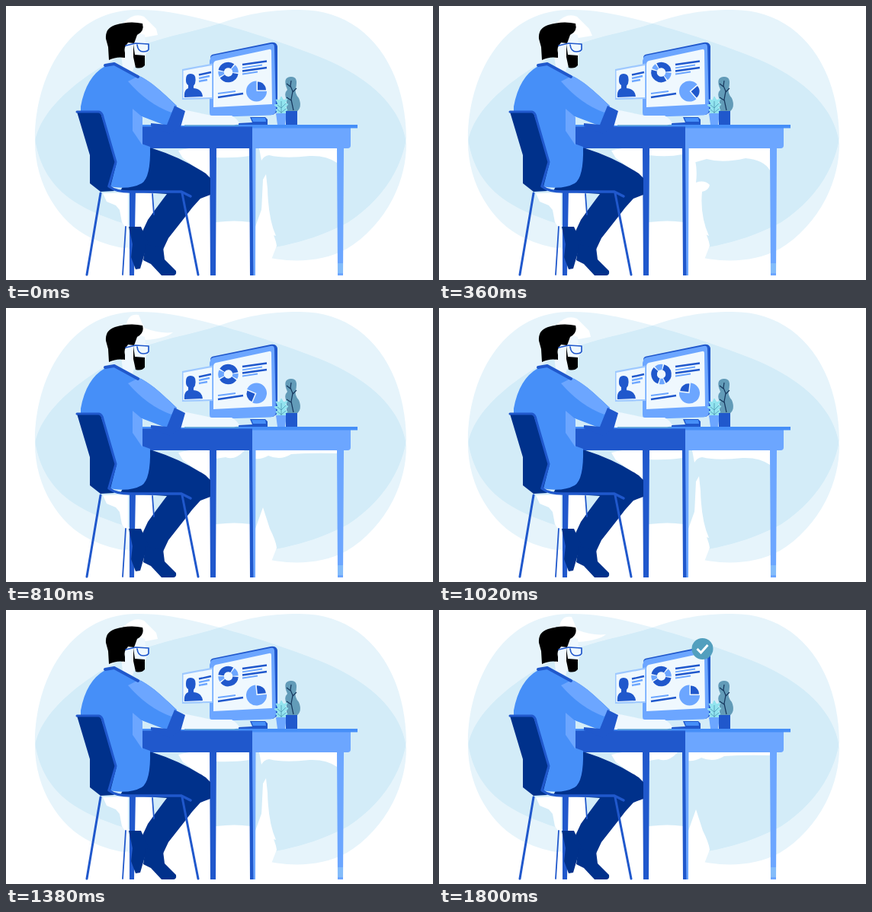
Write an HTML page that moves like this. It is 560x360 px and loops after 4530 ms.

```html
<!DOCTYPE html>
<html lang="en">
<head>
<meta charset="utf-8">
<style>
html, body { margin: 0; width: 100%; height: 100%; overflow: hidden; background: #fff; }
svg { display: block; width: 560px; height: 360px; }
.navy { fill: #00318b; }
.dark { fill: #2058cc; }
.mid { fill: #468ff8; }
.light { fill: #6ca6ff; }
.pale { fill: #eff8fe; }
.white { fill: #fff; }
.line { fill: none; stroke: #2058cc; stroke-linecap: round; stroke-linejoin: round; }
.bars { fill: none; stroke-width: 2.4; }
</style>
</head>
<body>
<svg viewBox="0 0 560 360">
  <defs>
    <path id="blobA" d="M168 5C205 4 240 12 280 23C330 37 362 48 404 64C462 86 517 123 525 181C525 238 492 292 447 319C412 338 367 338 331 327C270 307 190 302 130 277C72 255 46 224 38 175C38 93 82 8 168 5Z"/>
    <path id="blobB" d="M385 5C340 5 312 12 280 23C246 34 212 39 177 52C108 84 46 130 38 179C38 230 66 283 112 305C164 329 216 320 270 322C334 326 399 311 449 284C494 254 518 215 525 174C524 78 472 5 385 5Z"/>
    <clipPath id="insideA"><use href="#blobA"/></clipPath>
  </defs>

  <g fill="#e6f4fb"><use href="#blobA"/><use href="#blobB"/></g>
  <use href="#blobB" fill="#d3ecf8" clip-path="url(#insideA)"/>

  <!-- gaps in the backdrop -->
  <g class="white">
    <path d="M127 246L160 245V360H154L155 318L160 317L158 293L152 284L149 268L144 262L132 257Z"/>
    <path d="M168 360V246H193V282L214 290L237 262L246 247H268V285L276 284Q300 281 321 284L327 290L337 262L346 290Q354 306 355 315L348 333V360Z"/>
    <path d="M226 190L240 187H268V226L232 200Z"/>
    <path id="deskGap"/>
    <path id="slit"/>
    <path id="headGap"/>
  </g>

  <!-- desk -->
  <path class="dark" d="M162 240H170L168 354H162ZM267 186H276L275 354H268ZM319 186H324L325 354H320Z"/>
  <path class="light" d="M323 186H327.500L327 354H324.500ZM434 186H443L442 354H435Z"/>
  <path d="M435 338H442V351H435Z" fill="#83bcfa"/>
  <path class="dark" d="M178 156H323V187H183L178 182Z"/>
  <path class="light" d="M323 160H452V183Q452 187 448 187H323Z"/>
  <path class="mid" d="M178 156H461V160.500H323V159H178Z"/>
  <path class="dark" d="M178 158.500H323V161H178Z"/>

  <!-- monitor -->
  <path class="dark" d="M320 146H340L343 149V156H305V154L323 153Z"/>
  <path class="mid" d="M322 147H340L341 152H324Z"/>
  <path class="dark" d="M268 68Q268 64 272 63.500L347 48Q355 47 356 53V139L350 143Z"/>
  <path class="light" d="M268 69Q268 66 272 65L347 50Q352 49 352 54L354 136Q354 143 347 143.500L273 146Q267 146 267 140V72Z"/>
  <path class="pale" d="M272 77Q272 73 275 72L345 57Q348 56 348 60L349 129L272 133Z"/>
  <g class="bars">
    <path d="M310 77L342 72.500M310 85.500L342 81M278 120L311 115" stroke="#2058cc"/>
    <path d="M310 81.300L336 77.500M310 89.500L330 86.500M278 115L301 112" stroke="#6ca6ff" stroke-width="1.800"/>
  </g>
  <g id="donut" fill="none" stroke-width="7.500"></g>
  <g id="pie">
    <path class="light" d="M0 0V-13.500A13.500 13.500 0 1 0 13.500 0Z"/>
    <path class="dark" d="M1.500 -1.500V-12.500A11 11 0 0 1 12.500 -1.500Z"/>
  </g>

  <!-- profile card -->
  <path d="M231 83L271 75.500V122L231 123Z" fill="#9dc8ff"/>
  <path class="pale" d="M232.500 85L270 78V120L232.500 121Z"/>
  <path class="dark" d="M234 120Q233 110 239 108V104Q235.500 102 236 96Q236 89 242 89Q248.500 89 248.500 96Q249 102 246 105V108Q257 109 258 119Z"/>
  <path class="bars" d="M253 90.500L269 87" stroke="#2058cc"/>
  <path class="bars" d="M253 95L267 92M253 99L264 97" stroke="#6ca6ff"/>

  <!-- plants -->
  <path d="M368 139V123Q364 115 369 110Q362 94 373 93Q384 92 380 108Q378 114 384 121Q389 133 381 139Z" fill="#629bb8"/>
  <path d="M374 98L373 105L376 112L374 123L377 137M373 106L368 102M376 113L381 108M374 124L368 120" fill="none" stroke="#15365c" stroke-width="1.200"/>
  <path d="M357 142L354 136L358 135L352 130L357 129L354 123L359 124L361 119L364 124L369 122L366 128L370 129L366 134L369 136L365 142Z" fill="#92e4ef" stroke="#92e4ef" stroke-linejoin="round"/>
  <path d="M356 130L361 134L367 128M356 136L361 140L367 135M361 125V141" fill="none" stroke="#438ca9" stroke-width=".7"/>
  <path class="light" d="M354 141H368L366 156H356Z"/>
  <path class="dark" d="M367 138H382V156H367Z"/>

  <!-- trousers and shoes -->
  <path class="navy" d="M180 186L192 187Q230 199 262 220L268 226V248L255 253Q245 263 235 277L213 305L206 320L183 316L179 296L186 281Q198 264 211 247L150 243Z"/>
  <path class="navy" d="M161 290H177L188 314L183 321L176 345L170 346L164 330L166 313Z"/>
  <path class="navy" d="M183 313L206 317L208 333L223 348Q224 354 219 354H204L190 339L180 334Z"/>

  <!-- shirt -->
  <path class="mid" d="M130 79Q105 93 98 132L98 140L125 142L142 206L135 237Q162 242 178 233Q190 225 189 185L178 181V145L212 158L224 131C210 118 190 98 173 91L139 76Z"/>
  <path class="light" d="M166 135L179 146V183L166 164Z"/>
  <path class="light" d="M160 99L174 92C190 98 210 118 223 131L217 140Q186 129 160 99Z"/>

  <!-- arm -->
  <path class="pale" d="M232 136L270 144L296 144Q303 148 306 154L299 157H229Z"/>
  <path class="dark" d="M221 131L235 138L229 159L215 168L190 158V154L211 156Z"/>
  <path d="M234 157H305" stroke="#58a0d4" stroke-width="1.600"/>

  <!-- chair -->
  <path class="navy" d="M93 139L124 140L145 206L137 237L142 243L124 244L110 233V196Z"/>
  <path class="line" d="M93 139H122Q126 140 127 146L144 205L135 236" stroke-width="3"/>
  <path class="line" d="M135 237Q145 245 168 244H230L242 250" stroke-width="3.500"/>
  <path class="line" d="M124 246L106 353M231 246L252 353" stroke-width="3"/>
  <path class="line" d="M192 247L194 274M157 290L153 353" stroke-width="1.800"/>

  <!-- head -->
  <path class="pale" d="M150 40L166 33L182 38L184 62L180 78L168 80L166 86L153 80L151 64Z"/>
  <path d="M135 71L134 54L131 43Q130 29 143 25Q162 19 179 23Q182 33 172 38L168 49L160 48L156 55V68Q145 66 135 71Z"/>
  <path d="M167 50L169 64L182 65V78Q178 83 170 81L167 67Z"/>
  <ellipse class="pale" cx="161" cy="58" rx="5.500" ry="8.500"/>
  <path class="pale" d="M171 51H187V60Q181 63 173 60Z"/>
  <path class="line" d="M157 52L170 49L187 50V57Q186 60 180 60Q173 60 172 51" stroke-width="1.700"/>
  <path class="line" d="M130 78L142 76L173 93" stroke-width="4"/>

  <g id="badge">
    <circle r="14" fill="#529fbe"/>
    <path d="M-7 0L-2 5L7 -5" fill="none" stroke="#fff" stroke-width="3"/>
  </g>
</svg>
<script>
const LOOP = 4530, STEP = 30, LAST = 1800;
const $ = id => document.getElementById(id);

const looks = {
  wide: {
    deskGap: 'M275 187H319V197Q300 200 275 199ZM332 187H434V206Q420 196 398 197Q365 201 345 196Q338 197 335 203Z',
    slit: 'M335 270L337 228L341 221L343 240Q344 280 354 302L346 300Z',
    headGap: 'M154 22Q168 8 181 14L197 30L199 38L183 41Z'
  },
  tall: {
    deskGap: 'M275 187H319V195Q300 199 275 196ZM328 187H434V216Q426 202 402 200Q372 207 351 201L337 205H328Z',
    slit: 'M327 290V203H336Q339 216 337 232Q348 228 355 235Q354 242 345 244Q342 275 354 302Z',
    headGap: 'M154 22Q168 8 181 14L197 30L201 39L183 42Z'
  },
  small: {
    deskGap: 'M275 187H313Q300 201 288 196L275 198ZM326 187H434V191Q400 190 374 192Q360 201 344 194Q336 199 326 198Z',
    slit: '',
    headGap: 'M158 22Q160 7 174 9L181 26Q201 34 219 32Q209 40 183 42Z'
  }
};
const schedule = [[0, 'wide'], [210, 'tall'], [480, 'wide'], [690, 'small'], [1020, 'wide'], [1650, 'small']];

const polar = (r, deg) => {
  const a = (deg - 90) * Math.PI / 180;
  return `${r * Math.cos(a)} ${r * Math.sin(a)}`;
};
const arc = (from, to, color) =>
  `<path d="M${polar(9.5, from)}A9.5 9.5 0 0 1 ${polar(9.5, to)}" stroke="${color}"/>`;
$('donut').innerHTML = arc(-77, 36, '#2058cc') + arc(44, 92, '#6ca6ff') +
  arc(100, 235, '#2058cc') + arc(243, 275, '#6ca6ff');

const clamp = x => Math.min(1, Math.max(0, x));
const easeInOut = x => (1 - Math.cos(Math.PI * x)) / 2;
const easeOut = x => 1 - (1 - x) ** 2;
let shown = '';

function draw(now) {
  const t = Math.min(LAST, Math.floor((now % LOOP) / STEP) * STEP);
  const turn = 360 * easeInOut(clamp(t / 1500));
  $('donut').setAttribute('transform', `translate(291.5 87) rotate(${turn})`);
  $('pie').setAttribute('transform', `translate(328.5 112) rotate(${turn})`);
  const size = easeOut(clamp((t - 1440) / 300));
  $('badge').setAttribute('transform', `translate(345.5 51) scale(${size})`);

  const look = schedule.filter(([start]) => start <= t).pop()[1];
  if (look !== shown) {
    for (const [id, d] of Object.entries(looks[look])) $(id).setAttribute('d', d);
    shown = look;
  }
}

const start = performance.now();
function tick() {
  draw(performance.now() - start);
  requestAnimationFrame(tick);
}
tick();
</script>
</body>
</html>
```
